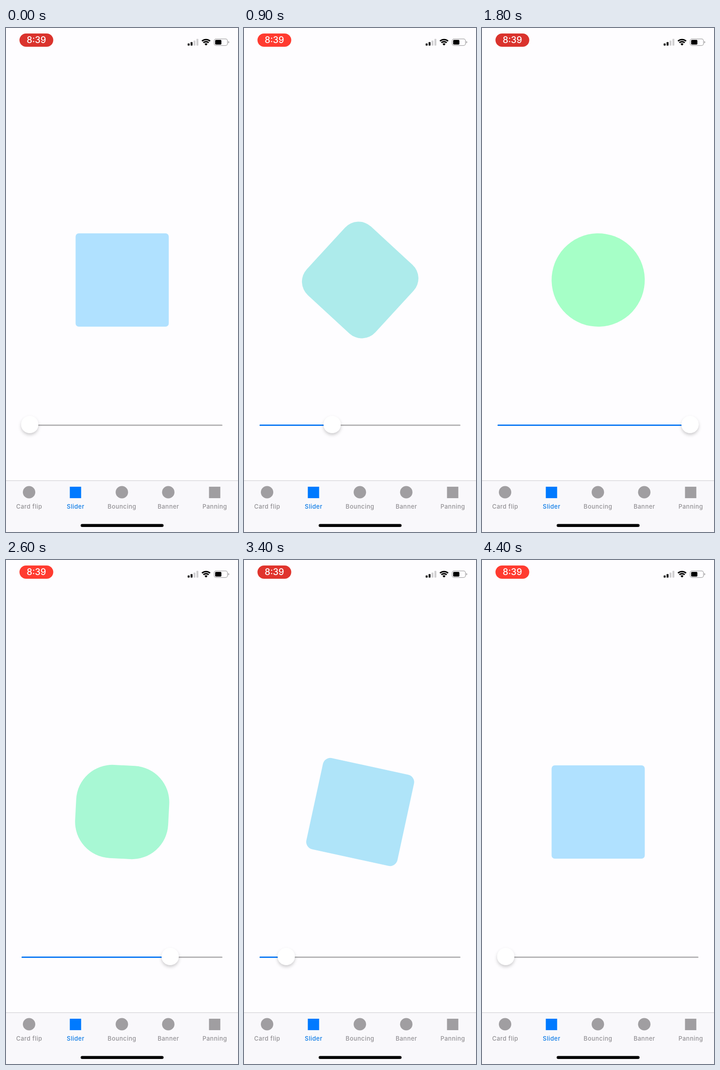
An HTML page that plays this animation: 508 by 1102 pixels, repeating every 4500 ms.

```html
<!DOCTYPE html>
<html lang="en">
<head>
<meta charset="utf-8">
<title>Slider</title>
<style>
  html, body { margin: 0; width: 100%; height: 100%; overflow: hidden; background: #fefdff; }
  svg { display: block; width: 508px; height: 1102px; }
  text { font-family: Inter, "Liberation Sans", sans-serif; font-weight: 500; text-anchor: middle; }
  .tab { fill: #a09ea1; }
  .tab text { font-size: 13px; letter-spacing: .5px; fill: #929094; }
  .tab.on, .tab.on text { fill: #007aff; }
  .tab.on text { fill: #0a7ae6; }
</style>
</head>
<body>
<svg viewBox="0 0 508 1102">
  <defs>
    <filter id="shadow" x="-60%" y="-60%" width="220%" height="220%">
      <feDropShadow dx="0" dy="4" stdDeviation="3.6" flood-color="#000" flood-opacity=".2"/>
    </filter>
  </defs>
  <rect width="508" height="1102" fill="#fefdff"/>

  <rect id="pill" x="29.5" y="12" width="74" height="29" rx="14.5"/>
  <text x="66.5" y="33.4" font-size="19.5" fill="#fff">8:39</text>

  <g id="signal">
    <rect x="397.8" y="33.8" width="4.2" height="4.8" rx="1"/>
    <rect x="404.2" y="30.8" width="4.2" height="7.8" rx="1"/>
    <rect x="410.6" y="27.4" width="4.2" height="11.2" rx="1" fill="#d0cfd1"/>
    <rect x="417" y="23.8" width="4.2" height="14.8" rx="1" fill="#d0cfd1"/>
  </g>
  <g id="wifi" fill="none" stroke="#000" stroke-width="3.1">
    <path d="M429.1 28.6A13.3 13.3 0 0 1 446.9 28.6"/>
    <path d="M432.2 32.1A8.6 8.6 0 0 1 443.8 32.1"/>
    <path d="M438 38.5L434.6 34.8A5 5 0 0 1 441.4 34.8Z" fill="#000" stroke="none"/>
  </g>
  <g id="battery">
    <rect x="455.8" y="23.8" width="29.2" height="14.6" rx="4.4" fill="none" stroke="#a3a2a4" stroke-width="1.3"/>
    <rect x="458" y="26" width="13.6" height="10.2" rx="2"/>
    <path d="M486.6 28.6Q488.8 29.4 488.8 31.1T486.6 33.6Z" fill="#a3a2a4"/>
  </g>

  <rect id="box" x="-102" y="-102" width="204" height="204"/>

  <rect x="34" y="867" width="440" height="3" rx="1.5" fill="#b5b4b6"/>
  <rect id="fill" x="34" y="867" height="3" rx="1.5" fill="#0f7af4"/>
  <circle id="thumb" cy="867" r="18.8" fill="#fff" filter="url(#shadow)"/>

  <rect y="989" width="508" height="113" fill="#f9f8fb"/>
  <rect y="989" width="508" height="1.3" fill="#d5d4d7"/>
  <g id="tabs"></g>
  <rect x="163.5" y="1084.5" width="181.5" height="6.5" rx="3.25"/>
</svg>
<script>
const LOOP = 4500, STEP = 100;
const X0 = 52, X1 = 455.5;
const $ = id => document.getElementById(id);

// [time, thumb centre]
const keys = [
  [0, 52], [300, 52], [600, 88], [900, 193], [1200, 322], [1500, 425], [1700, 455.5],
  [2100, 455.5], [2400, 404.5], [2600, 359.5], [3000, 214.5], [3400, 92.5],
  [3600, 60], [3800, 52], [4500, 52]
];

$('tabs').innerHTML = [
  ['Card flip', 'circle'], ['Slider', 'square'], ['Bouncing', 'circle'],
  ['Banner', 'circle'], ['Panning', 'square']
].map(([name, shape], i) => {
  const x = 50.5 + i * 101.6;
  const icon = shape === 'circle'
    ? `<circle cx="${x}" cy="1015" r="13.6"/>`
    : `<rect x="${x - 12.4}" y="1003" width="24.8" height="25"/>`;
  return `<g class="tab${i === 1 ? ' on' : ''}">${icon}<text x="${x + .25}" y="1051.3">${name}</text></g>`;
}).join('');

const lerp = (a, b, p) => a + (b - a) * p;
const mix = (a, b, p) => `rgb(${a.map((v, i) => Math.round(lerp(v, b[i], p)))})`;
const slope = i => (keys[i + 1][1] - keys[i][1]) / (keys[i + 1][0] - keys[i][0]);

// Harmonic mean of neighbouring slopes keeps the curve from overshooting.
function tangent(i) {
  if (i === 0 || i === keys.length - 1) return 0;
  const a = slope(i - 1), b = slope(i);
  return a * b > 0 ? 2 * a * b / (a + b) : 0;
}

function thumbAt(t) {
  let i = 0;
  while (i < keys.length - 2 && t >= keys[i + 1][0]) i++;
  const [t0, a] = keys[i], [t1, b] = keys[i + 1];
  const d = t1 - t0, u = (t - t0) / d, v = 1 - u;
  return a * v * v * (1 + 2 * u) + b * u * u * (3 - 2 * u)
    + d * u * v * (v * tangent(i) - u * tangent(i + 1));
}

function draw(t) {
  const x = thumbAt(t), p = (x - X0) / (X1 - X0);
  $('thumb').setAttribute('cx', x);
  $('fill').setAttribute('width', x - 34);

  const box = $('box');
  box.setAttribute('transform', `translate(254.4 551) rotate(${122 * p})`);
  box.setAttribute('rx', lerp(7, 102, p));
  box.setAttribute('fill', mix([176, 225, 255], [166, 255, 199], p));

  const glow = Math.min(1, .675 * (1 - Math.cos(t / 1800 * 2 * Math.PI)));
  $('pill').setAttribute('fill', mix([218, 51, 45], [255, 59, 48], glow));
}

const start = performance.now();
function tick() {
  const t = (performance.now() - start) % LOOP;
  draw(Math.floor(t / STEP) * STEP);
  requestAnimationFrame(tick);
}
tick();
</script>
</body>
</html>
```
